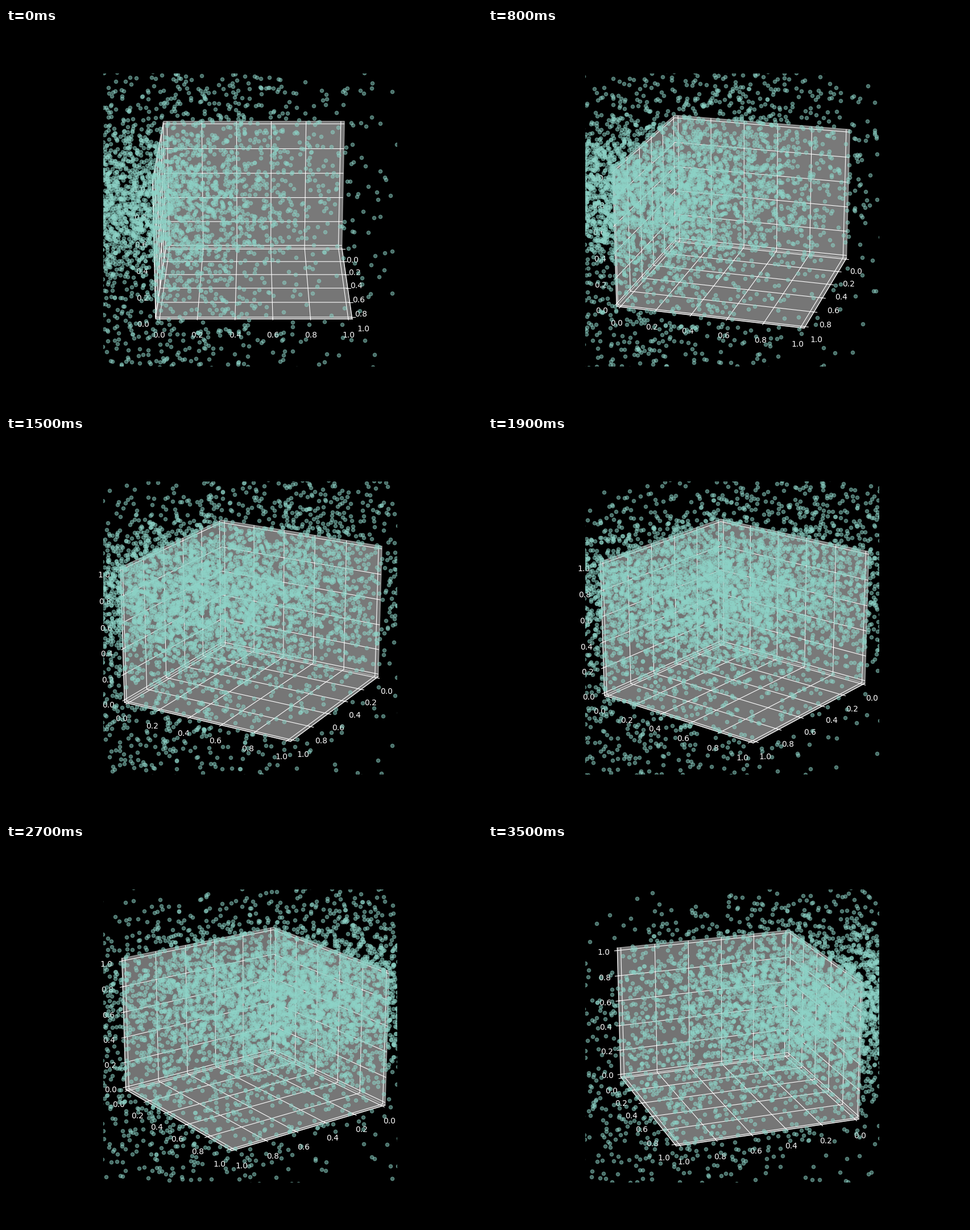
Animation, 837 px wide and 669 px high, one loop 3.6 s. Source, as a matplotlib script:

```python
import matplotlib.pyplot as plt
import numpy as np
from matplotlib.animation import FuncAnimation

WIDTH, HEIGHT, DPI = 837, 669, 100
FRAMES, INTERVAL = 36, 100
TURN = 2  # degrees per frame
MARGIN = 1 / 48

# count, centre, spread of each part of the cloud
CLUSTERS = [
    (4300, (-0.50, -0.52, 0.08), (0.62, 0.62, 0.24)),
    (700, (-0.50, -0.50, 0.10), (0.95, 0.95, 0.40)),
    (520, (0.75, -0.10, -0.45), (0.45, 0.60, 0.25)),
    (380, (-0.46, 0.25, 1.00), (0.50, 0.50, 0.22)),
]

rng = np.random.default_rng(4)
cloud = np.vstack([rng.normal(mid, spread, (n, 3))
                   for n, mid, spread in CLUSTERS])

plt.style.use("dark_background")
# the small excess keeps the pixel size from rounding down
fig = plt.figure(figsize=((WIDTH + 0.01) / DPI, (HEIGHT + 0.01) / DPI), dpi=DPI)
ax = fig.add_subplot(projection="3d")
ax.scatter(*cloud.T, alpha=0.5, depthshade=False)
lim = (-MARGIN, 1 + MARGIN)
ax.set(xlim=lim, ylim=lim, zlim=lim)


def update(frame):
    ax.view_init(elev=20, azim=TURN * frame)
    return ()


anim = FuncAnimation(fig, update, frames=FRAMES, interval=INTERVAL,
                     init_func=lambda: update(0), repeat=True, repeat_delay=0)
plt.show()
```
